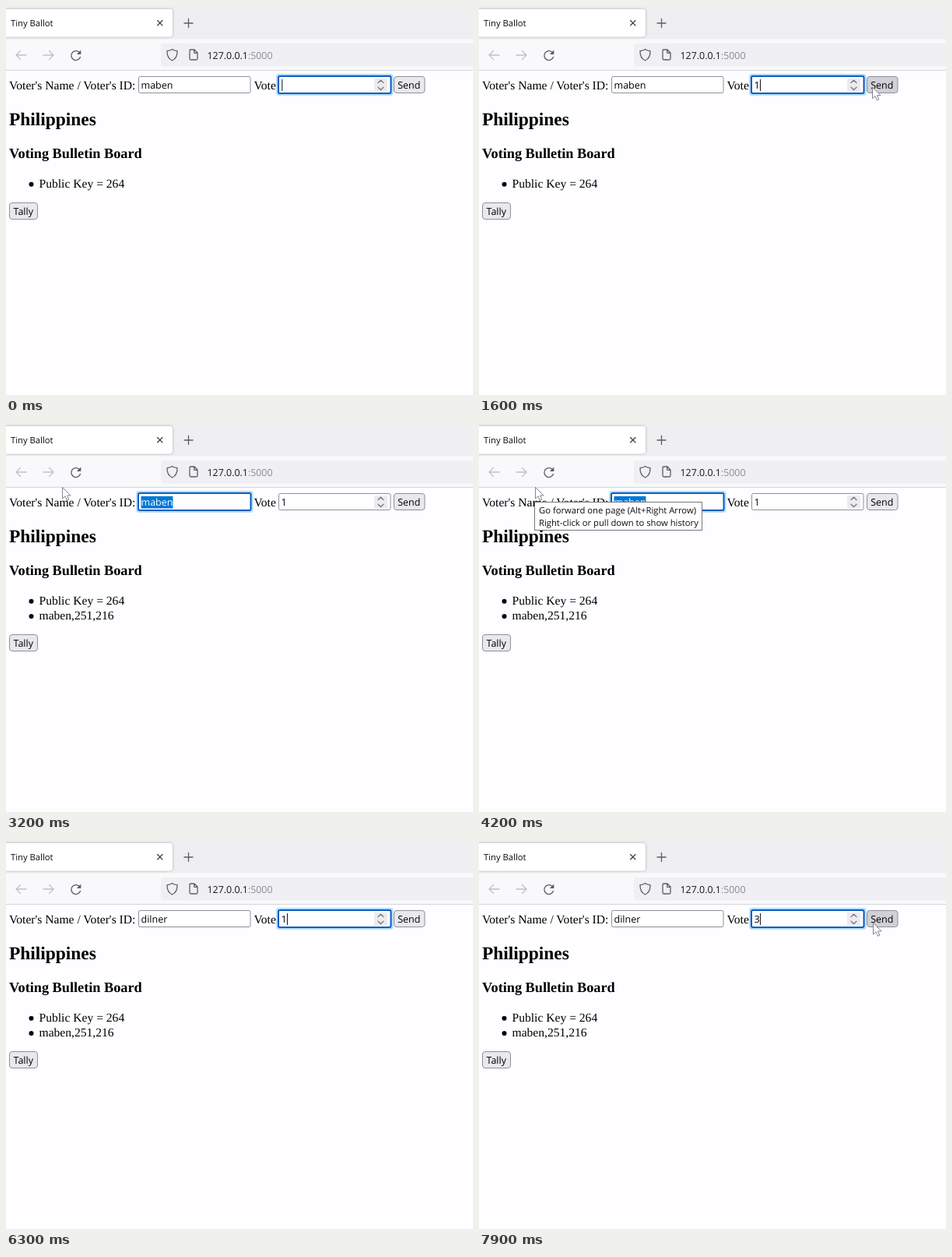
Animation, 600 px wide and 499 px high, one loop 8000 ms. Source, as an HTML page:

```html
<!DOCTYPE html>
<html lang="en">
<head>
<meta charset="utf-8">
<title>Voting demo</title>
<style>
  html, body { margin: 0; width: 100%; height: 100%; overflow: hidden; background: #fefdff; }
  svg { display: block; width: 100vw; height: 100vh; }
  text { white-space: pre; text-rendering: geometricPrecision; }
  .ui { font: 11.25px "Open Sans", sans-serif; fill: #0c0c10; }
  .url { font: 12.4px "Open Sans", sans-serif; fill: #15141a; }
  .page { font: 15.6px "Liberation Serif", serif; }
  .h2 { font: bold 23.4px "Liberation Serif", serif; }
  .h3 { font: bold 18.25px "Liberation Serif", serif; }
  .field { font: 12.5px "Open Sans", sans-serif; }
  .line { fill: none; stroke: #5b5b66; stroke-width: 1.3; stroke-linecap: round; stroke-linejoin: round; }
  .off { stroke: #c0c0c6; }
  .button { fill: #e9e9ed; stroke: #8f8f9d; }
  .box { fill: #fff; stroke: #8f8f9d; }
</style>
</head>
<body>
<svg viewBox="0 0 600 499" preserveAspectRatio="none">
  <defs>
    <filter id="shadow" x="-10%" y="-20%" width="120%" height="150%">
      <feDropShadow dx="0" dy="0" stdDeviation="1.6" flood-color="#555" flood-opacity=".5"/>
    </filter>
  </defs>
  <rect width="600" height="499" fill="#fefdff"/>

  <!-- Browser chrome -->
  <rect width="600" height="43" fill="#efeef0"/>
  <rect y="42.5" width="600" height="40" fill="#f9f9fb"/>
  <path d="M0 82.5H600" stroke="#d6d5da"/>
  <rect x="-8" y="4" width="222" height="35.5" rx="4" fill="#fff" filter="url(#shadow)"/>
  <text class="ui" x="6" y="26">Tiny Ballot</text>
  <path class="line" style="stroke:#3a3944;stroke-width:1.1" d="M194.5 18.5l6.5 6.5m0-6.5l-6.5 6.5"/>
  <path class="line" d="M229 22H240M234.5 16.5V27.5"/>
  <path class="line off" d="M26 63H13M18.5 57.5L13 63l5.5 5.5"/>
  <path class="line off" d="M48 63H61M55.5 57.5L61 63l-5.5 5.5"/>
  <path class="line" d="M95 60.5A6 6 0 1 0 95.5 65.5"/>
  <path d="M96.3 56.5V62H90.8Z" fill="#5b5b66"/>
  <rect x="199" y="48" width="410" height="29.5" rx="4" fill="#f0f0f4"/>
  <path class="line" d="M213.5 55.5C215.5 57 217.5 57.5 220 57.7C220.2 63 218.5 67.5 213.5 70C208.5 67.5 206.8 63 207 57.7C209.5 57.5 211.5 57 213.5 55.5Z"/>
  <path class="line" d="M237 56H242L246 60V67.5Q246 69 244.5 69H237.5Q236 69 236 67.5V57Q236 56 237 56ZM241.8 56.3V60.3H245.8"/>
  <text class="url" x="258.5" y="67.5">127.0.0.1<tspan fill="#8b8a94">:5000</tspan></text>

  <!-- Form -->
  <text class="page" x="4" y="107">Voter's Name / Voter's ID:</text>
  <g id="name"></g>
  <g id="vote"></g>
  <text class="page" x="318.5" y="107">Vote</text>
  <rect x="473" y="93" width="17" height="17" rx="1" fill="#ececef"/>
  <path class="line" style="stroke:#777680" d="M478 98.5l3.5-3.2l3.5 3.2M478 104.3l3.5 3.2l3.5-3.2"/>
  <rect id="send" class="button" x="498.5" y="90.5" width="39.5" height="21" rx="3.5"/>
  <text class="field" x="503.2" y="106.3">Send</text>

  <!-- Board -->
  <text class="h2" x="4" y="153">Philippines</text>
  <text class="h3" x="4" y="195">Voting Bulletin Board</text>
  <circle cx="32.5" cy="228.7" r="3"/>
  <text class="page" x="42.5" y="233">Public Key = 264</text>
  <g id="entry">
    <circle cx="32.5" cy="248" r="3"/>
    <text class="page" x="42.5" y="252.3">maben,251,216</text>
  </g>
  <g id="tally">
    <rect class="button" x="4.5" y="252.5" width="36" height="21" rx="3.5"/>
    <text class="field" x="9.5" y="268.3">Tally</text>
  </g>

  <!-- Overlays -->
  <g id="tip">
    <rect x="71.5" y="101.5" width="215" height="36" fill="#fff" stroke="#777"/>
    <text class="ui" x="77" y="116">Go forward one page (Alt+Right Arrow)</text>
    <text class="ui" x="77" y="131.5">Right-click or pull down to show history</text>
  </g>
  <path id="arrow" d="M.5 .5V15L4 11.900L6.400 17.300L8.800 16.200L6.500 11H11Z" fill="#fff" stroke="#77767f" stroke-width=".9"/>
  <path id="beam" d="M-3 -7H3M0 -7V7M-3 7H3" fill="none" stroke="#333"/>
</svg>
<script>
const LOOP = 8000, STEP = 100;
const $ = id => document.getElementById(id);
const show = (node, on) => node.setAttribute('visibility', on ? 'visible' : 'hidden');
const place = (node, x, y) => node.setAttribute('transform', `translate(${x} ${y})`);
const between = (t, a, b) => t >= a && t < b;

// Time, x, y of the pointer tip
const path = [
  [800, 440, 122], [1200, 505, 103], [1900, 505, 104], [2200, 487, 107],
  [2400, 487, 107], [2800, 212, 100], [3200, 72, 82], [5800, 72, 82],
  [7800, 505, 104], [7900, 506, 106]
];

function pointer(t) {
  if (t < 800 || between(t, 5800, 7800)) return null;
  let i = 0;
  while (i < path.length - 2 && path[i + 1][0] <= t) i++;
  const [t0, x0, y0] = path[i], [t1, x1, y1] = path[i + 1];
  let k = Math.min(1, (t - t0) / (t1 - t0));
  k = k * k * (3 - 2 * k);
  return [x0 + (x1 - x0) * k, y0 + (y1 - y0) * k];
}

function add(parent, tag, attrs) {
  const node = document.createElementNS('http://www.w3.org/2000/svg', tag);
  for (const key in attrs) node.setAttribute(key, attrs[key]);
  return parent.appendChild(node);
}

function makeField(id, x) {
  const g = $(id), left = x + 3.5;
  const glow = add(g, 'rect', { x: x - 3, y: 87, width: 150.5, height: 28, rx: 4, fill: '#b5dcf8' });
  add(g, 'rect', { class: 'box', x: x + .5, y: 90.5, width: 143.5, height: 21, rx: 2 });
  const ring = add(g, 'rect', { x, y: 90, width: 144.5, height: 22, rx: 2, fill: '#fff', stroke: '#0b5cc4', 'stroke-width': 2 });
  const mark = add(g, 'rect', { y: 94, height: 15.5, fill: '#0078d7' });
  const label = add(g, 'text', { class: 'field', x: left, y: 106.3 });
  const caret = add(g, 'rect', { y: 94, width: 1, height: 15, fill: '#111' });

  return (value, focus, from) => {
    label.textContent = value;
    const width = value ? label.getComputedTextLength() : 0;
    const selected = from !== undefined && from < left + width;
    const start = selected ? Math.max(left, from) : left;
    show(glow, focus);
    show(ring, focus);
    show(mark, selected);
    mark.setAttribute('x', start);
    mark.setAttribute('width', Math.max(0, left + width - start));
    label.setAttribute('fill', selected ? '#fff' : '#000');
    show(caret, focus && !selected);
    caret.setAttribute('x', left + width + (value ? .3 : .8));
  };
}

const setName = makeField('name', 170);
const setVote = makeField('vote', 350);

function update(t) {
  const tip = pointer(t);
  const typed = Math.floor((t - 4700) / 120) + 1;
  const dragging = between(t, 2800, 4700);
  setName(t < 4700 ? 'maben' : 'dilner'.slice(0, typed),
    between(t, 2800, 5900), dragging ? tip[0] : undefined);

  const vote = t < 300 ? '' : t < 6600 ? '1' : t < 6900 ? '' : '3';
  setVote(vote, t < 1700 || t >= 5900, between(t, 5900, 6300) ? 0 : undefined);

  const pressed = between(t, 1500, 1600);
  const hover = between(t, 1300, 2100) || t >= 7800;
  $('send').style.fill = pressed ? '#b1b1b9' : hover ? '#d0d0d7' : '#e9e9ed';

  const posted = t >= 1700;
  show($('entry'), posted);
  place($('tally'), 0, posted ? 19 : 0);
  show($('tip'), between(t, 3600, 5800));

  const inField = tip && tip[1] > 90 && tip[1] < 112 &&
    (between(tip[0], 170, 314) || between(tip[0], 350, 473));
  show($('arrow'), tip && !inField);
  show($('beam'), inField);
  if (tip) {
    place($('arrow'), ...tip);
    place($('beam'), ...tip);
  }
}

function frame() {
  const t = performance.now() % LOOP;
  update(Math.floor(t / STEP) * STEP);
  requestAnimationFrame(frame);
}
frame();
</script>
</body>
</html>
```
